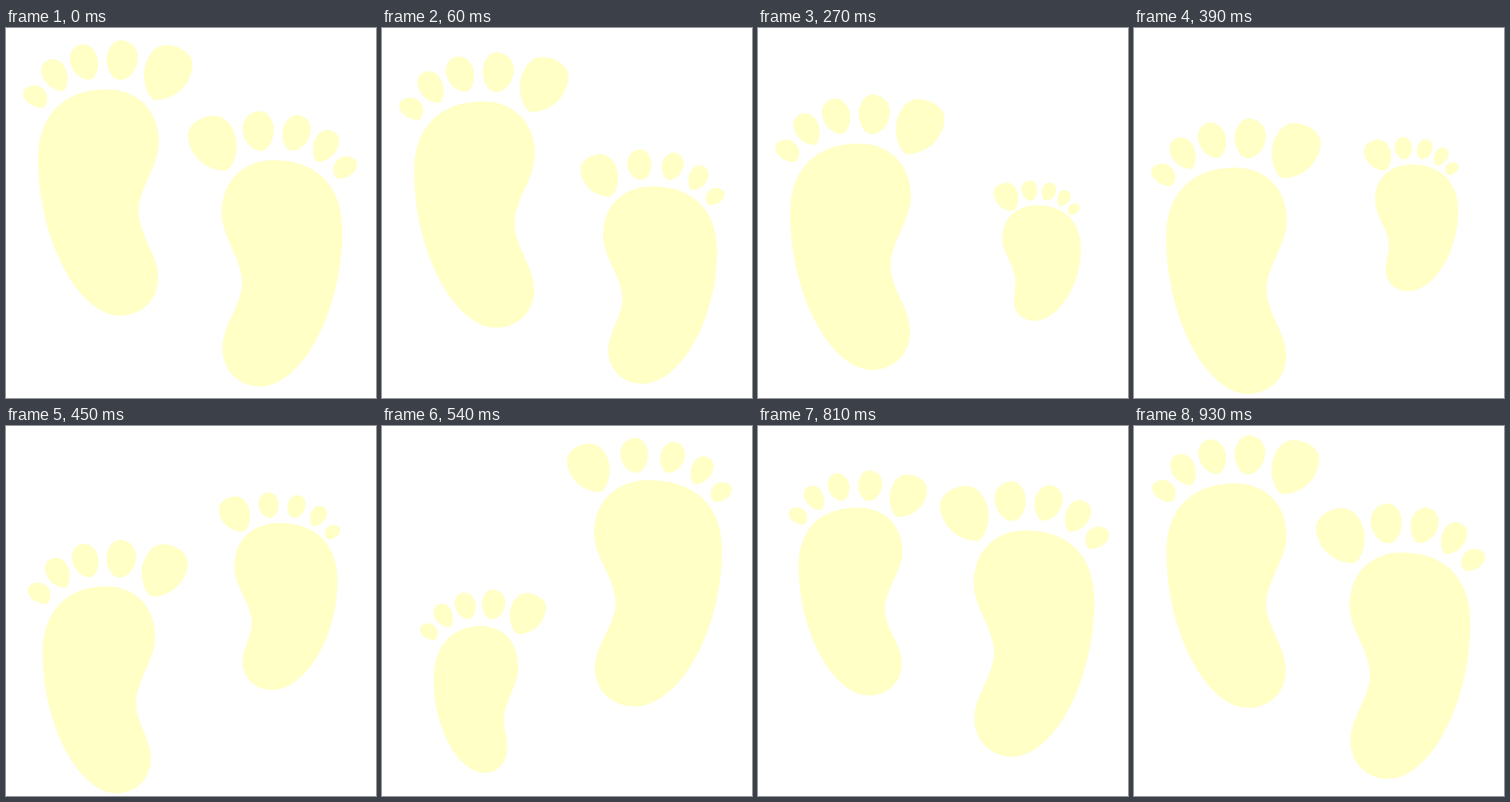
These frames come from a looping animation (512 by 512 pixels, 960 ms). An HTML page with a canvas:

```html
<!DOCTYPE html>
<html lang="en">
<head>
<meta charset="utf-8">
<title>Footsteps</title>
<style>
  html, body { margin: 0; width: 100%; height: 100%; overflow: hidden; background: #fff; }
  canvas { display: block; width: 512px; height: 512px; }
</style>
</head>
<body>
<canvas id="stage" width="512" height="512"></canvas>
<script>
const LOOP = 960, STEP = 30, SETTLE = 60;
const SOLE_WIDTH = 167, SOLE_LENGTH = 313;
const ctx = document.getElementById('stage').getContext('2d');

// Outline extremes in a unit box, x = 0 on the inner side; dx, dy apply when the foot is raised.
const SOLE = [
  { x: .43, y: 0, round: .6, flat: true, dx: .01, dy: 0 },
  { x: 0, y: .235, round: .34, dx: 0, dy: .045 },
  { x: .169, y: .54, round: .34, dx: 0, dy: .1 },
  { x: .006, y: .83, round: .58, dx: .124, dy: 0 },
  { x: .32, y: 1, round: .51, flat: true, dx: .08, dy: 0 },
  { x: 1, y: .31, round: .63, dx: 0, dy: .06 }
];

// Big toe to little toe: centre, half sizes, and how far the tip leans inward.
const TOES = [
  { x: -83.5, y: -2.5, w: 33.5, h: 38, lean: -.5 },
  { x: -20, y: -19.5, w: 21.5, h: 27.5, lean: -.16 },
  { x: 33, y: -17, w: 19.5, h: 24.5, lean: .37 },
  { x: 74, y: 1, w: 18, h: 22, lean: .67 },
  { x: 100.5, y: 31, w: 16.5, h: 15.5, lean: .58 }
];

// Swing poses from lift-off to landing: [time, scale, raise, spread, top of the sole].
const FEET = [
  {
    side: -1, x: 128, drift: 2, shorten: .13,
    swing: [
      [400, 1, 0, 1, 196],
      [540, .745, 1, .94, 277],
      [660, .556, 1, .964, 273],
      [810, .83, 0, 1.035, 113],
      [960, 1, 0, 1, 85]
    ]
  },
  {
    side: 1, x: 382, drift: 9, shorten: 0,
    swing: [
      [0, 1, 0, 1, 183],
      [150, .59, 1, 1.26, 271],
      [390, .56, 1, 1.23, 189],
      [540, 1, 0, 1.06, 75]
    ]
  }
];

// On the ground a foot slides back steadily; in the air it follows a smooth curve.
function pose(swing, time) {
  const first = swing[0], last = swing[swing.length - 1];
  const start = first[0], land = last[0];
  const speed = (first[4] - last[4]) / (start + LOOP - land);
  if (time < start || time >= land) {
    const age = (time - land + LOOP) % LOOP;
    const settled = Math.min(1, age / SETTLE);
    return last.map((v, k) => k === 4 ? v + speed * age : v + (first[k] - v) * settled);
  }
  const i = swing.findIndex((key, n) => time < swing[n + 1][0]);
  const slope = (n, k) => {
    const a = swing[n - 1], b = swing[n + 1];
    return a && b ? (b[k] - a[k]) / (b[0] - a[0]) : k === 4 ? speed : 0;
  };
  const from = swing[i], to = swing[i + 1], span = to[0] - from[0];
  const u = (time - from[0]) / span, v = 1 - u;
  return from.map((p, k) =>
    p * v * v * (1 + 2 * u) + to[k] * u * u * (1 + 2 * v)
    + span * u * v * (slope(i, k) * v - slope(i + 1, k) * u));
}

// Closed curve through extremes, level at flat points and upright at the others.
function fillOutline(points) {
  const handle = (p, q, round) => p.flat
    ? [p.x + (q.x - p.x) * round, p.y]
    : [p.x, p.y + (q.y - p.y) * round];
  ctx.beginPath();
  ctx.moveTo(points[0].x, points[0].y);
  points.forEach((p, i) => {
    const q = points[(i + 1) % points.length];
    ctx.bezierCurveTo(...handle(p, q, p.round), ...handle(q, p, p.round), q.x, q.y);
  });
  ctx.fill();
}

function drawToe({ x, y, w, h, lean }, size, lift) {
  const at = (u, v, flat) => ({ x: x - 13 + u * w * size, y: y - 21 * lift + v * h * size, flat, round: .53 });
  fillOutline([
    at(.1, -1, true),
    at(1, -.1 - .35 * lean),
    at(-lean, 1, true),
    at(-1, .4 * lean - .1)
  ]);
}

function drawFoot({ side, x, drift, shorten, swing }, time) {
  const [, scale, raise, spread, top] = pose(swing, time);
  const width = SOLE_WIDTH * spread, length = SOLE_LENGTH * (1 - shorten * raise);
  const squeeze = 2 * Math.max(0, (spread - 1) * (1 - raise));
  ctx.save();
  ctx.translate(x + drift * raise, top);
  ctx.scale(side * scale, scale);
  fillOutline(SOLE.map(p => ({
    ...p,
    x: (p.x + p.dx * raise - .5) * width,
    y: (p.y + p.dy * raise) * length
  })));
  for (const toe of TOES) drawToe(toe, 1 - squeeze, 1 - 2.5 * squeeze);
  ctx.restore();
}

function draw() {
  const time = Math.floor(performance.now() % LOOP / STEP) * STEP;
  ctx.clearRect(0, 0, 512, 512);
  ctx.fillStyle = '#ffffc6';
  for (const foot of FEET) drawFoot(foot, time);
  requestAnimationFrame(draw);
}
draw();
</script>
</body>
</html>
```
